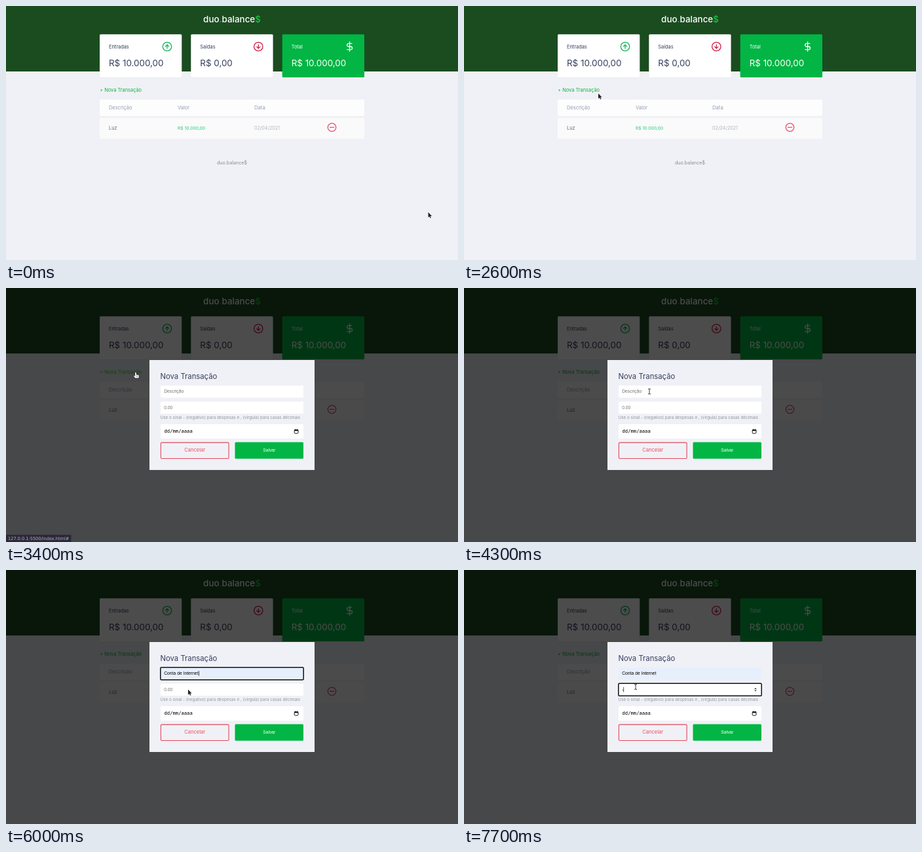
These frames come from a looping animation (690 by 388 pixels, 8000 ms). An HTML page with a canvas:

```html
<!DOCTYPE html>
<html lang="pt-BR">
<head>
<meta charset="utf-8">
<title>Nova Transação</title>
<style>
html, body { margin: 0; width: 100%; height: 100%; overflow: hidden; background: #f0f1f6; }
canvas { display: block; width: 690px; height: 388px; }
</style>
</head>
<body>
<canvas id="stage"></canvas>
<script>
const W = 690, H = 388, LOOP = 8000, STEP = 100;
const canvas = document.getElementById('stage');
const dpr = window.devicePixelRatio || 1;
canvas.width = W * dpr;
canvas.height = H * dpr;
const ctx = canvas.getContext('2d');

const UI = 'Inter, "Open Sans", sans-serif';
const FORM = '"Liberation Sans", Arial, sans-serif';
const MENU = '"Noto Sans", "Open Sans", sans-serif';
const MONO = '"DejaVu Sans Mono", monospace';
const NAVY = '#363f5f', GREEN = '#02b544', RED = '#d92f4f', MUTED = '#969cb3';

// Pointer path: time, x, y
const PATH = [
  [0, 644.5, 315], [1000, 644.5, 315], [1700, 290, 119], [2000, 245, 120],
  [2400, 212, 138], [2800, 198, 129], [3400, 198, 129], [3600, 222, 150],
  [4300, 283, 158], [4700, 283, 158], [5000, 283.5, 184], [5900, 283.5, 184],
  [6200, 262, 178.5]
];

const DOLLAR = new Path2D('M12 1V23M17 5H9.5a3.5 3.5 0 0 0 0 7h5a3.5 3.5 0 0 1 0 7H6');
const ARROW = new Path2D('M0 0V8.1L1.9 6.4L3.1 9.2L4.4 8.6L3.2 6H5.7Z');
const HAND = new Path2D('M-.9 .8C-.9-.3 .8-.3 .8 .8V3.4L3.8 4Q4.9 4.3 4.8 5.4L4.4 8.6H-.7L-2.9 5.8Q-3.2 4.7-2 5L-.9 5.9Z');
const IBEAM = new Path2D('M-1.6-4Q0-4 0-3Q0-4 1.6-4M0-3V3M-1.6 4Q0 4 0 3Q0 4 1.6 4');

function text(str, x, y, size, color, { font = UI, weight = 400, align = 'left' } = {}) {
  ctx.font = `${weight} ${size}px ${font}`;
  ctx.textAlign = align;
  ctx.fillStyle = color;
  ctx.fillText(str, x, y);
}

function box(x, y, w, h, color, r = 1.5) {
  ctx.fillStyle = color;
  ctx.beginPath();
  ctx.roundRect(x, y, w, h, r);
  ctx.fill();
}

function frame(x, y, w, h, color, width) {
  ctx.strokeStyle = color;
  ctx.lineWidth = width;
  ctx.beginPath();
  ctx.roundRect(x, y, w, h, 1.5);
  ctx.stroke();
}

function lines(color, width, ...paths) {
  ctx.strokeStyle = color;
  ctx.lineWidth = width;
  ctx.lineCap = ctx.lineJoin = 'round';
  ctx.beginPath();
  for (const [start, ...rest] of paths) {
    ctx.moveTo(...start);
    for (const p of rest) ctx.lineTo(...p);
  }
  ctx.stroke();
}

function ring(x, y, r, color) {
  ctx.strokeStyle = color;
  ctx.lineWidth = 1.3;
  ctx.beginPath();
  ctx.arc(x, y, r, 0, Math.PI * 2);
  ctx.stroke();
}

function arrowIcon(x, y, dir, color) {
  ring(x, y, 6.7, color);
  lines(color, 1.3, [[x, y - 2.8 * dir], [x, y + 2.8 * dir]],
    [[x - 2.7, y + .1 * dir], [x, y + 2.8 * dir], [x + 2.7, y + .1 * dir]]);
}

function card(x, label, amount, fill, color) {
  ctx.save();
  ctx.shadowColor = 'rgba(0,0,0,.08)';
  ctx.shadowBlur = 2 * dpr;
  box(x, 43.3, 125.3, 65.7, fill);
  ctx.restore();
  text(label, x + 14, 64.7, 7.4, color);
  text(amount, x + 14, 92.4, 13.4, color);
}

function logo() {
  const parts = [['duo', '#fff'], ['.', '#1fc84b'], ['balance', '#fff'], ['$', '#16c641']];
  ctx.font = `500 13.4px ${UI}`;
  const widths = parts.map(p => ctx.measureText(p[0]).width);
  let x = 345 - widths.reduce((a, b) => a + b) / 2;
  parts.forEach(([str, color], i) => {
    text(str, x, 24.8, 13.4, color, { weight: 500 });
    x += widths[i];
  });
}

function page(hover) {
  box(0, 0, W, H, '#f0f1f6', 0);
  box(0, 0, W, 100, '#1b4c20', 0);
  logo();
  card(143, 'Entradas', 'R$ 10.000,00', '#fff', NAVY);
  card(282.3, 'Saídas', 'R$ 0,00', '#fff', NAVY);
  card(421.7, 'Total', 'R$ 10.000,00', GREEN, '#fff');
  arrowIcon(246, 62, -1, '#12b45a');
  arrowIcon(385.3, 62, 1, '#cc2046');

  ctx.save();
  ctx.translate(524.6 - 12 * .66, 62 - 12 * .66);
  ctx.scale(.66, .66);
  ctx.strokeStyle = '#fff';
  ctx.lineWidth = 1.9;
  ctx.lineCap = 'round';
  ctx.stroke(DOLLAR);
  ctx.restore();

  text('+ Nova Transação', 143.3, 130.8, 7.4, hover ? '#2fe02f' : '#0fb548');
  box(143, 143, 404, 25, '#fdfdfe', 1);
  text('Descrição', 157, 157.7, 7.45, MUTED);
  text('Valor', 262, 157.7, 7.45, MUTED);
  text('Data', 379, 157.7, 7.7, MUTED);
  box(143, 171, 404, 31.7, '#fafafb', 1);
  text('Luz', 157, 189, 7.45, '#666b85');
  text('R$ 10.000,00', 262, 189, 6.75, '#2fc97c');
  text('02/04/2021', 379, 189, 7.1, '#b0b4c4');
  ring(497.5, 185.4, 6.2, '#e8506b');
  lines('#e8506b', 1.3, [[494.5, 185.4], [500.5, 185.4]]);
  text('duo.balance$', 345, 242, 7.13, '#85889a', { align: 'center' });
}

function field(y, h, value, { fill = '#fff', color = '#000', focus = false } = {}) {
  box(236, y, 218, h, fill, 1.2);
  if (focus) frame(235.8, y - .2, 218.4, h + .4, '#101010', 1.5);
  text(value, 241.2, y + 11.2, 6.78, color, { font: FORM });
}

function caret(x, y) {
  box(x, y - 3.8, .7, 7.6, '#000', 0);
}

function triangle(x, y, dir) {
  ctx.fillStyle = '#333';
  ctx.beginPath();
  ctx.moveTo(x - 1.8, y);
  ctx.lineTo(x + 1.8, y);
  ctx.lineTo(x, y + 2 * dir);
  ctx.fill();
}

function menu(active) {
  ctx.save();
  ctx.shadowColor = 'rgba(0,0,0,.4)';
  ctx.shadowBlur = 3 * dpr;
  ctx.shadowOffsetY = dpr;
  box(235.5, 171, 219, 60, '#fff', 1);
  ctx.restore();
  if (active) box(235.5, 172.5, 219, 18, '#c8c8c8', 0);
  ['Conta de Internet', 'Gás', 'Luz'].forEach((item, i) =>
    text(item, 241.3, 184.3 + i * 18.2, 7.95, '#222', { font: MENU, weight: 500 }));
}

function modal(t) {
  const first = t >= 4700 && t < 6400, second = t >= 6400;
  const filled = t >= 5000, typed = t >= 7700;
  const blink = start => Math.floor((t - start) / 600) % 2 === 0;

  box(0, 0, W, H, 'rgba(0,0,0,.7)', 0);
  box(219, 110, 252, 168, '#f0f1f6', 0);
  text('Nova Transação', 235.5, 139.4, 11.3, NAVY);

  field(149, 18.5, filled ? 'Conta de Internet' : 'Descrição',
    { fill: filled ? '#e7effd' : '#fff', color: filled ? '#000' : '#757575', focus: first });
  field(173.5, 18.5, typed ? '-' : '0.00',
    { color: typed ? '#000' : '#757575', focus: second });
  if (first && blink(4700)) caret(t < 6000 ? 241.2 : 294, 158);
  if (second) {
    if (blink(6400)) caret(typed ? 243.4 : 241.2, 182.6);
    triangle(445, 182, -1);
    triangle(445, 183.4, 1);
  }
  text('Use o sinal - (negativo) para despesas e , (vírgula) para casas décimais',
    235.5, 199.7, 6.34, '#92949f');

  box(236, 208, 218, 22, '#fff', 1.2);
  text('dd/mm/aaaa', 241.5, 221.4, 7.2, '#000', { font: MONO });
  frame(440.2, 216.8, 5.8, 5.4, '#111', 1);
  box(440, 216.4, 6.2, 1.9, '#111', 0);
  lines('#111', .8, [[441.4, 215.8], [441.4, 217]], [[444.8, 215.8], [444.8, 217]]);

  frame(236.4, 236.1, 103.7, 24.4, '#e04a5d', 1.1);
  text('Cancelar', 288.2, 250.2, 7.6, '#ea5265', { align: 'center' });
  box(349.5, 235.6, 104.5, 25.2, GREEN);
  text('Salvar', 401.8, 250.2, 6.7, '#fff', { font: FORM, align: 'center' });

  if (t >= 4700 && t < 6000) menu(filled);
}

function status(dim) {
  box(0, 377, 99.5, 11, dim ? '#2b2939' : '#1f1d29', 0);
  text('127.0.0.1:5500/index.html#', 3, 385, 6.6, '#b4b3bf', { font: '"DejaVu Sans", sans-serif' });
}

function pointerAt(t) {
  const i = PATH.findIndex(p => p[0] > t);
  if (i < 0) return PATH[PATH.length - 1].slice(1);
  const [t0, x0, y0] = PATH[i - 1], [t1, x1, y1] = PATH[i];
  const u = (t - t0) / (t1 - t0), e = u * u * (3 - 2 * u);
  return [x0 + (x1 - x0) * e, y0 + (y1 - y0) * e];
}

function pointer(t, hand) {
  const [x, y] = pointerAt(t);
  const overField = t >= 6100 || (t > 3600 && t < 4900 && x > 236 && y > 149 && y < 168);
  ctx.save();
  ctx.translate(x, y);
  ctx.lineJoin = ctx.lineCap = 'round';
  if (overField) {
    ctx.strokeStyle = '#222';
    ctx.lineWidth = .9;
    ctx.stroke(IBEAM);
  } else {
    ctx.strokeStyle = hand ? '#222' : '#fff';
    ctx.fillStyle = hand ? '#fff' : '#222';
    ctx.lineWidth = hand ? .9 : 1.2;
    const shape = hand ? HAND : ARROW;
    ctx.stroke(shape);
    ctx.fill(shape);
    if (hand) lines('#444', .5, [[.9, 4.8], [.9, 6.8]], [[2.6, 5], [2.6, 6.8]]);
  }
  ctx.restore();
}

function draw(now) {
  const t = Math.floor((now % LOOP) / STEP) * STEP;
  const hover = t >= 2800 && t < 3500, open = t >= 3400;
  ctx.setTransform(dpr, 0, 0, dpr, 0, 0);
  page(hover);
  if (open) modal(t);
  if (t >= 3000 && t < 3900) status(open);
  pointer(t, hover);
}

const begin = performance.now();
function tick() {
  draw(performance.now() - begin);
  requestAnimationFrame(tick);
}
tick();
</script>
</body>
</html>
```
